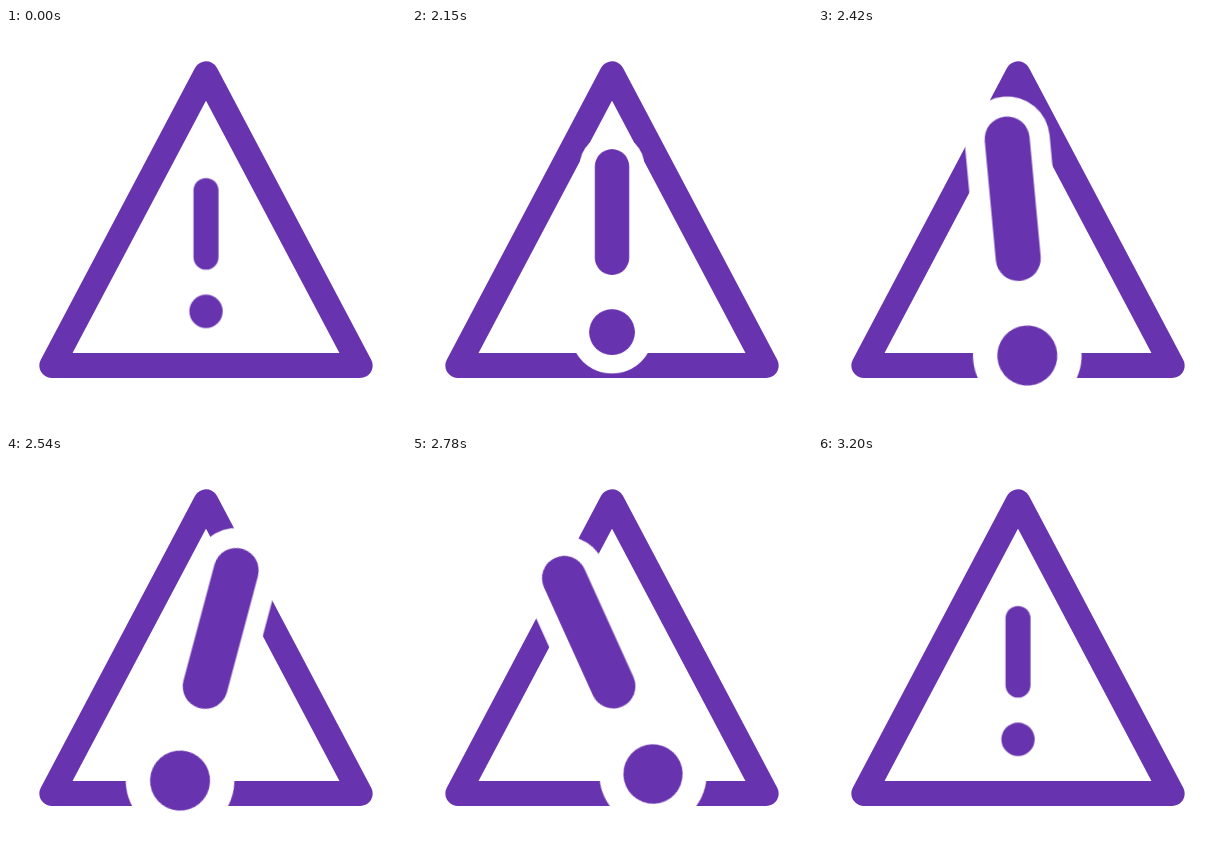
An HTML page that plays this animation: 400 by 400 pixels, repeating every 3.23 s.

```html
<!DOCTYPE html>
<html lang="en">
<head>
<meta charset="utf-8">
<title>Warning</title>
<style>
  html, body { margin: 0; width: 100%; height: 100%; overflow: hidden; background: #fff; }
  svg { display: block; width: 100vw; height: 100vh; }

  .line { fill: none; stroke: #6833ae; stroke-width: 1.5; stroke-linecap: round; stroke-linejoin: round; }
  .dot { fill: #6833ae; }
  .halo .line { stroke: #fff; stroke-width: 2.84; }
  .halo .dot { fill: #fff; }

  .grow, .swing { transform-origin: 12px 13.65px; animation: 3230ms ease-in-out infinite; }
  .grow { animation-name: grow; }
  .swing { animation-name: swing; }

  /* a 1.2 s burst after a rest of about 2 s */
  @keyframes grow {
    0%, 62.136% { transform: scale(1); }
    71.424%, 84.427% { transform: scale(1.8); }
    99.288%, 100% { transform: scale(1); }
  }
  @keyframes swing {
    0%, 67.709% { transform: rotate(0deg); }
    73.282% { transform: rotate(-10deg); }
    78.854% { transform: rotate(15deg); }
    84.427% { transform: rotate(-30deg); }
    90%, 100% { transform: rotate(0deg); }
  }
</style>
</head>
<body>
<svg viewBox="0 0 24 24">
  <path class="line" d="M12 2.75 21.25 20.25H2.75Z"/>
  <g class="grow">
    <g class="swing">
      <g class="halo">
        <path class="line" d="M12 9.75V13.75"/>
        <circle class="dot" cx="12" cy="17" r="1.81"/>
      </g>
      <path class="line" d="M12 9.75V13.75"/>
      <circle class="dot" cx="12" cy="17" r="1"/>
    </g>
  </g>
</svg>
</body>
</html>
```
